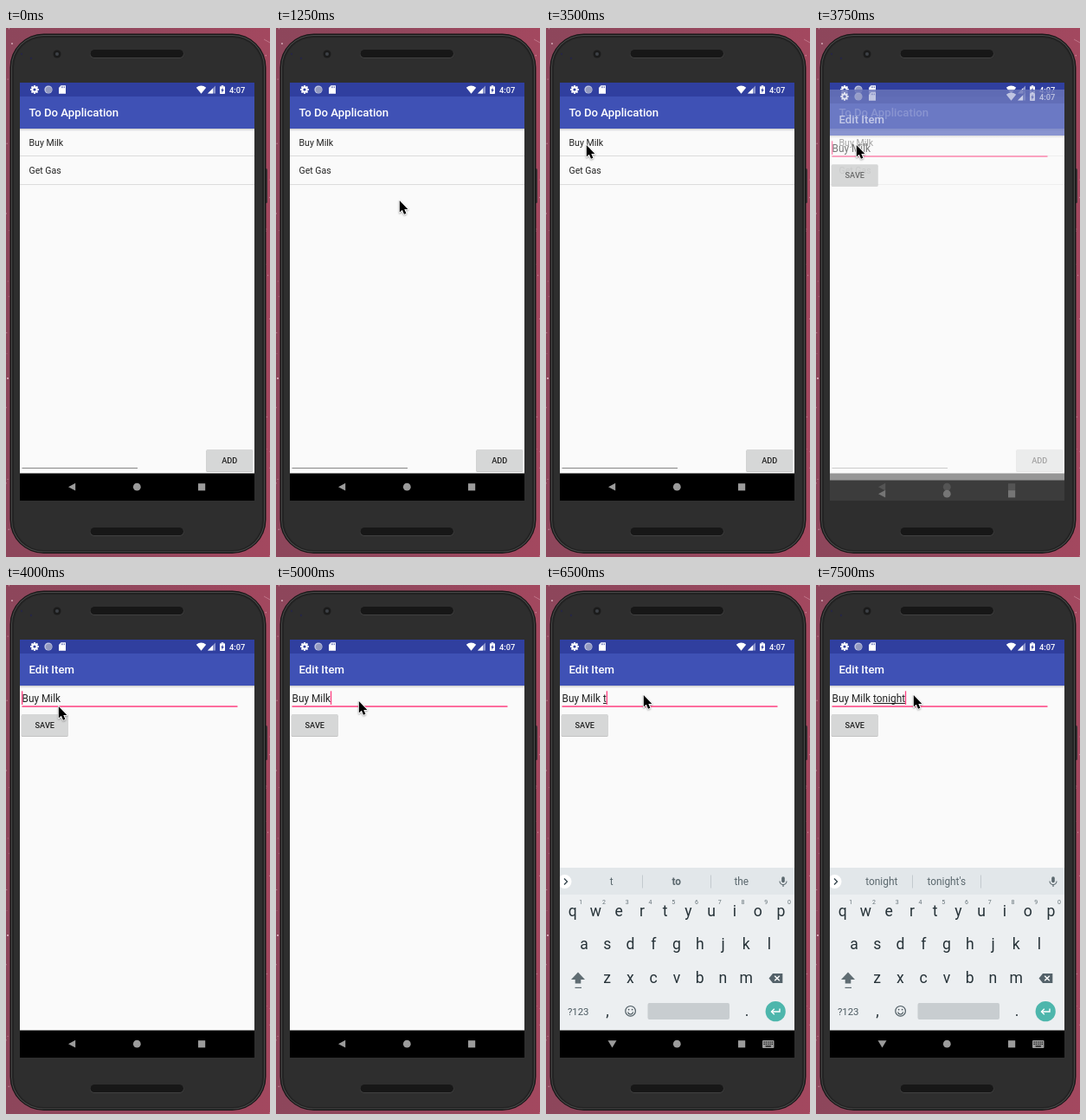
Write an HTML page with a canvas that moves like this. It is 305 px wide and 610 px high and loops after 8000 ms.

```html
<!DOCTYPE html>
<html lang="en">
<head>
<meta charset="utf-8">
<title>To Do Application</title>
<style>
html, body { margin: 0; width: 100%; height: 100%; overflow: hidden; background: #8f465b; }
canvas { display: block; width: 305px; height: 610px; }
</style>
</head>
<body>
<canvas id="stage"></canvas>
<script>
const W = 305, H = 610, LOOP = 8000;
const canvas = document.getElementById('stage');
const ctx = canvas.getContext('2d');
const dpr = window.devicePixelRatio || 1;
canvas.width = W * dpr;
canvas.height = H * dpr;

const PINK = '#ff4081', INK = '#212121', KEY_INK = '#263238', NAV = '#9b9b9b';

// Each track is [start, value] and holds until the next start.
const pointer = [[0, null], [750, [254, 150]], [1000, [208, 153]], [1250, [142, 198]],
  [1500, [125, 145]], [1750, [105, 136]], [2000, [105, 147]], [2250, [105, 136]],
  [3250, [50, 134]], [3500, [46, 134]], [4000, [60, 139]], [4250, [79, 148]],
  [4500, [96, 146]], [4750, [95, 133]], [5500, [112, 126]]];
const typed = [[0, ''], [6000, ' '], [6500, ' t'], [6750, ' to'], [7250, ' tonig'], [7500, ' tonight']];
const caret = [[0, 'start'], [4250, ''], [4750, 'start'], [5000, 'end'], [5750, ''], [6000, 'end']];
const hints = [[0, ['Milk', 'Mill', 'Milkshake']], [6000, ['and', 'in', 'the']],
  [6500, ['t', '*to', 'the']], [6750, ['to', 'today', 'too']],
  [7250, ['tonig', 'tonight', "tonight's"]], [7500, ['tonight', "tonight's", '']]];

const at = (track, t) => track.reduce((v, [start, next]) => t >= start ? next : v, null);

function rect(x, y, w, h, fill) {
  ctx.fillStyle = fill;
  ctx.fillRect(x, y, w, h);
}

function round(x, y, w, h, r, fill) {
  ctx.beginPath();
  ctx.roundRect(x, y, w, h, r);
  ctx.fillStyle = fill;
  ctx.fill();
}

function disc(x, y, r, fill) {
  ctx.beginPath();
  ctx.arc(x, y, r, 0, Math.PI * 2);
  ctx.fillStyle = fill;
  ctx.fill();
}

function poly(points, fill) {
  ctx.beginPath();
  points.forEach(([x, y]) => ctx.lineTo(x, y));
  ctx.closePath();
  ctx.fillStyle = fill;
  ctx.fill();
}

function line(points, color, width = 1) {
  ctx.beginPath();
  points.forEach(([x, y]) => ctx.lineTo(x, y));
  ctx.strokeStyle = color;
  ctx.lineWidth = width;
  ctx.stroke();
}

function text(str, x, y, size, color = INK, weight = 400, align = 'left') {
  ctx.font = `${weight} ${size}px Roboto, sans-serif`;
  ctx.textAlign = align;
  ctx.fillStyle = color;
  ctx.fillText(str, x, y);
}

function fade(x0, y0, x1, y1, ...colors) {
  const g = ctx.createLinearGradient(x0, y0, x1, y1);
  colors.forEach((c, i) => g.addColorStop(i / (colors.length - 1), c));
  return g;
}

function drawWallpaper() {
  rect(0, 0, W, H, fade(0, 0, W, 0, '#8d465b', '#93475d', '#a3485f'));
  let seed = 11;
  const rnd = () => (seed = seed * 16807 % 2147483647) / 2147483647;
  for (let i = 0; i < 26; i++) {
    const x = i % 2 ? rnd() * 4 : 300 + rnd() * 5;
    disc(x, rnd() * H, 0.4 + rnd() * 0.4, 'rgba(240,200,210,.55)');
  }
  disc(2, 404, 1, '#e6c3cc');
  disc(7, 18, 0.9, '#dcb4bf');
  line([[298, 13], [305, 17]], 'rgba(230,180,195,.4)');
}

function drawPhone() {
  round(298, 162, 4, 40, 1.5, '#3a3034');
  round(4.5, 6.5, 296, 599.5, 39, '#171717');
  round(6, 8, 293, 596.5, 37, '#494949');
  round(7, 9, 291, 594.5, 36, '#222222');
  round(9, 11, 287, 591, 34, '#2e2e2e');
  for (const y of [25, 576]) {
    round(97, y, 108.5, 10, 5, '#414141');
    round(97.5, y, 107.5, 9, 4.5, '#171717');
  }
  disc(59, 30, 4.5, '#1b1b1b');
  disc(59, 30, 2, '#3d4147');
  disc(18, 30, 1.2, '#262645');
  disc(29, 35, 1.2, '#262645');
}

function drawStatusBar() {
  rect(16, 63, 271, 16, '#303f9f');
  for (let i = 0; i < 8; i++) {
    const a = i * Math.PI / 4, c = Math.cos(a), s = Math.sin(a);
    line([[33 + 2 * c, 71 + 2 * s], [33 + 4.9 * c, 71 + 4.9 * s]], '#fff', 1.9);
  }
  disc(33, 71, 3.7, '#fff');
  disc(33, 71, 1.6, '#303f9f');
  disc(49, 71, 4.6, '#c3c8e4');
  disc(49.4, 71.3, 3.6, '#9299bf');
  poly([[63.5, 66.3], [69, 66.3], [69, 75.8], [61, 75.8], [61, 69]], '#fff');
  for (const x of [63.8, 65.5, 67.2]) rect(x, 67.4, 0.7, 1.8, '#303f9f');
  ctx.beginPath();
  ctx.moveTo(225.5, 75.8);
  ctx.lineTo(219.8, 68.7);
  ctx.quadraticCurveTo(225.5, 64.5, 231.2, 68.7);
  ctx.fillStyle = '#fff';
  ctx.fill();
  poly([[242, 66.5], [242, 75.6], [233, 75.6]], '#8e97cc');
  poly([[239, 69.6], [239, 75.6], [233, 75.6]], '#fff');
  round(247, 67.2, 6, 8.8, 0.8, '#fff');
  rect(248.7, 66.2, 2.6, 1.2, '#fff');
  poly([[250.6, 68.4], [248.3, 72.3], [249.6, 72.3], [249.4, 75], [251.8, 71], [250.4, 71]], '#303f9f');
  text('4:07', 258, 74.7, 9.3, '#fff', 500);
}

function drawShell(title) {
  rect(16, 63, 271, 482, '#fafafa');
  drawStatusBar();
  rect(16, 79, 271, 37, '#3f51b5');
  rect(16, 116, 271, 3, fade(0, 116, 0, 119, '#cacaca', '#fafafa'));
  text(title, 26.5, 102.3, 13.2, '#fff', 500);
}

function drawNav(keys) {
  rect(16, 513.5, 271, 31.5, '#000');
  if (keys) {
    poly([[71.5, 525.2], [81.5, 525.2], [76.5, 533.6]], NAV);
    round(250, 525, 13.5, 9, 1, NAV);
    for (let r = 0; r < 2; r++)
      for (let c = 0; c < 5; c++) rect(251.5 + c * 2.3, 526.5 + r * 2.3, 1.2, 1.2, '#000');
    rect(253.6, 531.3, 6.3, 1.2, '#000');
  } else {
    poly([[72, 529.2], [80.2, 524.8], [80.2, 533.6]], NAV);
  }
  disc(151.3, 529.2, 4.4, NAV);
  rect(222, 525.2, 8.2, 8.2, NAV);
}

function drawButton(label, x, y) {
  round(x - 0.3, y + 0.8, 54, 25.3, 1.5, '#c3c3c3');
  round(x, y, 53.5, 25, 1.3, '#d6d7d7');
  text(label, x + 26.8, y + 15.5, 9.23, INK, 500, 'center');
}

function drawList() {
  drawShell('To Do Application');
  ['Buy Milk', 'Get Gas'].forEach((item, i) => {
    text(item, 26.5, 135.7 + i * 32.4, 10.55);
    rect(16, 147 + i * 33, 271, 1, '#dcdcdc');
  });
  rect(18.5, 507, 133.5, 1, '#868686');
  drawButton('ADD', 231.5, 486);
  drawNav(false);
}

function drawKeyRow(chars, x, y) {
  [...chars].forEach((ch, i) => text(ch, x + i * 26.75, y, 17.6, KEY_INK, 400, 'center'));
}

function drawKeyboard(t) {
  rect(16, 326, 271, 187.5, '#eceff1');
  rect(16, 326, 271, 31, '#e2e7ea');
  ctx.save();
  ctx.beginPath();
  ctx.rect(16, 326, 271, 31);
  ctx.clip();
  disc(21.5, 342, 8, '#fff');
  ctx.restore();
  line([[21, 338.5], [24.5, 342], [21, 345.5]], '#37474f', 1.4);
  at(hints, t).forEach((word, i) => {
    const bold = word[0] === '*';
    text(bold ? word.slice(1) : word, 75.8 + i * 75, 346.2, 11.87, '#5b686e', bold ? 700 : 400, 'center');
  });
  for (const x of [111, 190]) rect(x, 334.5, 1, 15, '#c3cace');

  round(272.2, 336.3, 3.6, 7, 1.8, '#5b686e');
  ctx.beginPath();
  ctx.arc(274, 341.5, 4, 0, Math.PI);
  ctx.strokeStyle = '#5b686e';
  ctx.lineWidth = 1.1;
  ctx.stroke();
  line([[274, 345.5], [274, 348]], '#5b686e', 1.2);

  drawKeyRow('qwertyuiop', 30.7, 381.5);
  drawKeyRow('asdfghjkl', 44, 420.2);
  drawKeyRow('zxcvbnm', 70.7, 459.2);
  [...'1234567890'].forEach((n, i) => text(n, 40.3 + i * 26.75, 368.3, 7, '#667379', 400, 'center'));

  poly([[37, 446.5], [45, 455], [40.3, 455], [40.3, 459.5], [33.7, 459.5], [33.7, 455], [29, 455]], '#5f6c72');
  rect(33.5, 463.8, 7.5, 1.2, '#5f6c72');
  poly([[257.5, 453.5], [262, 448], [273.3, 448], [273.3, 459], [262, 459]], '#54626a');
  line([[264.2, 450.8], [269.8, 456.3]], '#fff', 1.4);
  line([[269.8, 450.8], [264.2, 456.3]], '#fff', 1.4);

  text('?123', 37.2, 495.6, 11.4, '#4c5a61', 400, 'center');
  text(',', 71, 496.5, 17.6, KEY_INK, 400, 'center');
  text('.', 232, 496.5, 17.6, KEY_INK, 400, 'center');
  ctx.strokeStyle = '#4c5a61';
  ctx.lineWidth = 1.2;
  ctx.beginPath();
  ctx.arc(97.6, 491.3, 5.8, 0, Math.PI * 2);
  ctx.stroke();
  ctx.beginPath();
  ctx.arc(97.6, 492, 3, 0.15, Math.PI - 0.15);
  ctx.stroke();
  disc(95.6, 489.6, 0.9, '#4c5a61');
  disc(99.6, 489.6, 0.9, '#4c5a61');
  round(117.5, 482, 94.5, 19, 2, '#c8cdd0');
  disc(265.2, 491.7, 11.6, '#4db6ac');
  line([[270, 488.5], [270, 492], [260.5, 492]], '#fff', 1.4);
  line([[263.8, 488.7], [260.5, 492], [263.8, 495.3]], '#fff', 1.4);
}

function drawEditor(t) {
  const str = 'Buy Milk' + at(typed, t), x = 18.5;
  const keys = t >= 5250;
  drawShell('Edit Item');
  text(str, x, 134.9, 11.87);
  const end = x + ctx.measureText(str).width;
  if (keys && !str.endsWith(' ')) {
    const from = x + ctx.measureText(str.slice(0, str.lastIndexOf(' ') + 1)).width;
    rect(from, 136, end - from, 1, INK);
  }
  rect(18.5, 139.3, 249, 1.5, PINK);
  drawButton('SAVE', 18, 149);
  const mark = at(caret, t);
  if (mark) rect(mark === 'end' ? end - 0.2 : 18, 122.3, 1.3, 15.7, PINK);
  if (t >= 5250 && t < 6250) {
    disc(63, 147.2, 6.6, PINK);
    poly([[63, 138.2], [68.2, 143.2], [57.8, 143.2]], PINK);
  }
  if (keys) drawKeyboard(t);
  drawNav(keys);
}

function drawPointer(pos) {
  if (!pos) return;
  ctx.save();
  ctx.translate(pos[0] + 0.8, pos[1] + 1);
  ctx.beginPath();
  [[0, 0], [0, 13.6], [3.1, 10.8], [5.2, 15.7], [7.6, 14.7], [5.5, 9.9], [9.6, 9.9]]
    .forEach(([x, y]) => ctx.lineTo(x, y));
  ctx.closePath();
  ctx.lineJoin = 'round';
  ctx.lineWidth = 1.7;
  ctx.strokeStyle = '#fff';
  ctx.shadowColor = 'rgba(0,0,0,.35)';
  ctx.shadowBlur = 2 * dpr;
  ctx.shadowOffsetY = dpr;
  ctx.stroke();
  ctx.shadowColor = 'transparent';
  ctx.fillStyle = '#000';
  ctx.fill();
  ctx.restore();
}

function drawScreen(t) {
  ctx.save();
  ctx.beginPath();
  ctx.rect(16, 63, 271, 482);
  ctx.clip();
  if (t < 4000) drawList();
  if (t >= 3750) {
    // The editor fades in while rising into place.
    if (t < 4000) {
      ctx.globalAlpha = 0.6;
      ctx.translate(0, 8);
    }
    drawEditor(t);
  }
  ctx.restore();
}

function render(now) {
  const t = now % LOOP;
  ctx.setTransform(dpr, 0, 0, dpr, 0, 0);
  drawWallpaper();
  drawPhone();
  drawScreen(t);
  drawPointer(at(pointer, t));
}

let begin = null;
function tick(now) {
  begin ??= now;
  render(Math.max(0, now - begin));
  requestAnimationFrame(tick);
}
render(0);
requestAnimationFrame(tick);
</script>
</body>
</html>
```
